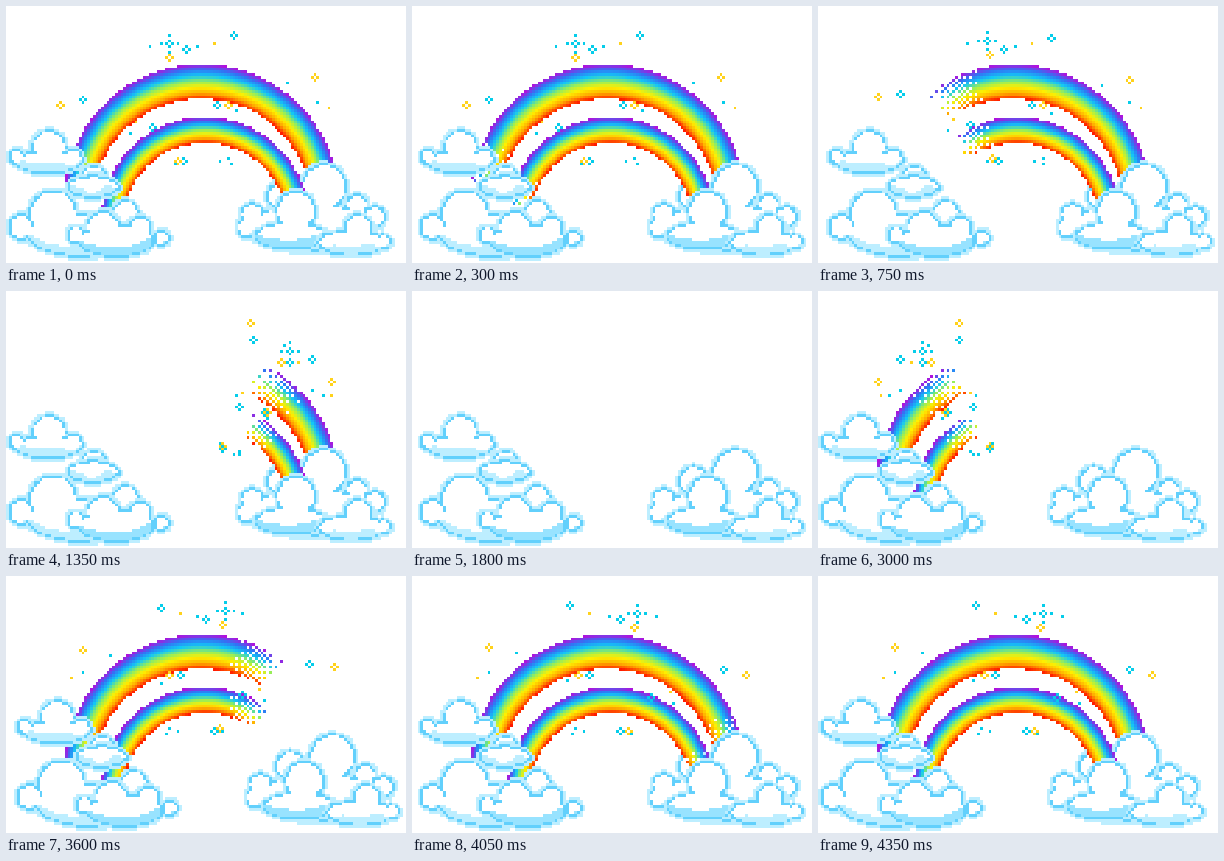
An HTML page with a canvas that plays this animation: 400x257 px, repeating every 4.5 s.

```html
<!DOCTYPE html>
<html lang="en">
<head>
<meta charset="utf-8">
<title>Double rainbow</title>
<style>
  html, body { margin: 0; width: 100%; height: 100%; overflow: hidden; background: #fff; }
  canvas { display: block; width: 100%; height: 100%; image-rendering: pixelated; }
</style>
</head>
<body>
<canvas id="stage" width="400" height="257"></canvas>
<script>
const COLS = 143, ROWS = 92, CELL = 400 / COLS;
const STEP = 150, STEPS = 30, MIRROR = 388;
const CYAN = '#06cdea', YELLOW = '#ffd21c';
const PALE = '#bdeeff', DEEP = '#98e3ff', LINE = '#62d0fc';

const stage = document.getElementById('stage').getContext('2d');
const art = document.createElement('canvas');
art.width = COLS;
art.height = ROWS;
const pen = art.getContext('2d');

const lerp = (a, b, t) => a + (b - a) * t;
const random = seed => {
  const value = Math.sin(seed * 12.9898) * 43758.5453;
  return value - Math.floor(value);
};

// Outside to inside: purple, blue, cyan, green, yellow, orange, red.
const STOPS = [[178, 16, 220], [48, 116, 244], [18, 200, 246], [150, 238, 90],
  [255, 240, 0], [255, 168, 0], [255, 24, 0]];

function bowColor(t) {
  const place = Math.min(0.999, t) * (STOPS.length - 1), i = Math.floor(place);
  return `rgb(${STOPS[i].map((v, k) => Math.round(lerp(v, STOPS[i + 1][k], place - i)))})`;
}

// Each rainbow lies between two circles with slightly different centres.
const outerBow = { x: 195.5, cy: 196, r: 138, innerCy: 203, innerR: 110, bottom: 185 };
const innerBow = { x: 199, cy: 215, r: 104, innerCy: 219, innerR: 82, bottom: 204 };

// A cloud is a wide body (x, y, rx, ry) with round puffs (x, y, r) on it.
const clouds = {
  rightBack: { body: [305, 222, 68, 27], shade: PALE,
    puffs: [[318, 181, 26], [276, 190, 18], [351, 199, 14], [369, 211, 14], [246, 209, 15], [241, 222, 13]] },
  leftBack: { body: [78, 229, 60, 25], shade: PALE,
    puffs: [[47, 208, 27], [15, 221, 16], [120, 207, 16]] },
  puffBack: { body: [88, 170, 15, 13], shade: PALE, puffs: [] },
  puffFront: { body: [87, 181, 29, 14], shade: PALE, puffs: [[88, 179, 14], [111, 181, 6]] },
  topLeft: { body: [42, 156, 36, 15], shade: PALE,
    puffs: [[43, 141, 20], [11, 151, 11], [67, 153, 13]] },
  leftFront: { body: [110, 235, 42, 19], shade: DEEP,
    puffs: [[97, 222, 20], [70, 229, 12], [134, 222, 15], [156, 232, 11]] },
  rightFront: { body: [285, 230, 40, 17], shade: DEEP, puffs: [[290, 205, 23]] },
  rightSmall: { body: [346, 237, 37, 16], shade: PALE,
    puffs: [[352, 222, 17], [377, 236, 11], [323, 235, 12]] }
};

function dot(col, row, color) {
  pen.fillStyle = color;
  pen.fillRect(col, row, 1, 1);
}

function eachCell(left, top, right, bottom, visit) {
  const c0 = Math.max(0, Math.floor(left / CELL)), c1 = Math.min(COLS, Math.ceil(right / CELL));
  const r0 = Math.max(0, Math.floor(top / CELL)), r1 = Math.min(ROWS, Math.ceil(bottom / CELL));
  for (let row = r0; row < r1; row++)
    for (let col = c0; col < c1; col++)
      visit(col, row, (col + 0.5) * CELL, (row + 0.5) * CELL);
}

// Ordered dither: a 4 by 4 pattern built from the bits of the position.
function ditherAt(col, row) {
  const level = bit => ((col ^ row) >> bit & 1) * 2 + (row >> bit & 1);
  return (level(0) * 4 + level(1) + 0.5) / 16;
}

function drawBow(bow, front, side) {
  eachCell(bow.x - bow.r, bow.cy - bow.r, bow.x + bow.r, bow.bottom, (col, row, x, y) => {
    const fromOuter = bow.r - Math.hypot(x - bow.x, y - bow.cy);
    const fromInner = Math.hypot(x - bow.x, y - bow.innerCy) - bow.innerR;
    if (fromOuter < 0 || fromInner < 0) return;
    const angle = Math.atan2((x - bow.x) * side, bow.cy - y) * 180 / Math.PI;
    if ((angle - front) / 25 >= ditherAt(col, row))
      dot(col, row, bowColor(fromOuter / (fromOuter + fromInner)));
  });
}

// Approximate distance from a point inward to the rim of an ellipse.
function depthIn([cx, cy, rx, ry = rx], x, y) {
  const dx = x - cx, dy = y - cy;
  const q = Math.hypot(dx / rx, dy / ry);
  const slope = Math.hypot(dx / rx ** 2, dy / ry ** 2);
  return slope ? (1 - q) * q / slope : Math.min(rx, ry);
}

function drawCloud({ body, puffs, shade }, shift) {
  const parts = [body, ...puffs];
  const left = Math.min(...parts.map(p => p[0] - p[2]));
  const right = Math.max(...parts.map(p => p[0] + p[2]));
  const top = Math.min(...parts.map(([, y, rx, ry = rx]) => y - ry));
  const bottom = Math.max(...parts.map(([, y, rx, ry = rx]) => y + ry));
  eachCell(left, top, right, bottom, (col, row, x, y) => {
    const depth = Math.max(...parts.map(p => depthIn(p, x, y)));
    if (depth < 0) return;
    const lit = depthIn(body, x + 3, y + 13) > 0 || puffs.some(p => depthIn(p, x + 2, y + 4) > 2);
    const color = depth < CELL ? PALE : depth < 1.85 * CELL ? LINE : lit ? '#fff' : shade;
    dot(col + shift, row, color);
  });
}

function drawSparkle(x, y, size, color) {
  const col = Math.floor(x / CELL), row = Math.floor(y / CELL);
  if (!size) dot(col, row, color);
  for (let arm = 1; arm < size * 2; arm += 2)
    for (const side of [-arm, arm]) {
      dot(col + side, row, color);
      dot(col, row + side, color);
    }
}

// Sparkles fan out above, between and below the rainbows, squeezed ahead of the fading end.
function drawSparkles(phase, flipped) {
  const start = Math.max(-60, 18 * phase - 146), end = 56;
  if (start > end) return;
  const put = (u, radius, size, color) => {
    const angle = lerp(start, end, u) * Math.PI / 180;
    const x = 195 + radius * Math.sin(angle);
    drawSparkle(flipped ? MIRROR - x : x, 196 - radius * Math.cos(angle), size, color);
  };
  put(0.42, 162, 2, CYAN);
  for (let i = 1; i <= 24; i++) {
    const ring = [157, 157, 95, 48][i % 4], spread = ring > 100 ? 28 : 16;
    put(i * 0.618 % 1, ring + (random(i) - 0.5) * spread,
      random(i + 40) > 0.35 ? 1 : 0, random(i + 80) > 0.5 ? YELLOW : CYAN);
  }
}

function drawStep(step) {
  const flipped = step >= STEPS / 2;
  const phase = flipped ? STEPS - 1 - step : step;
  const front = -119 + 16 * phase;
  const side = flipped ? -1 : 1;
  const shift = Math.round(1.5 - 1.5 * Math.cos((step % 10 + 0.5) * Math.PI / 5));

  pen.fillStyle = '#fff';
  pen.fillRect(0, 0, COLS, ROWS);
  drawBow(outerBow, front, side);
  drawCloud(clouds.rightBack, shift);
  drawBow(innerBow, front, side);
  for (const name of ['leftBack', 'puffBack', 'puffFront', 'topLeft', 'leftFront', 'rightFront', 'rightSmall'])
    drawCloud(clouds[name], shift);
  drawSparkles(phase, flipped);

  stage.imageSmoothingEnabled = false;
  stage.drawImage(art, 0, 0, COLS * CELL, ROWS * CELL);
}

let shown = -1;
function tick() {
  const step = Math.floor(performance.now() / STEP) % STEPS;
  if (step !== shown) drawStep(shown = step);
  requestAnimationFrame(tick);
}
tick();
</script>
</body>
</html>
```
